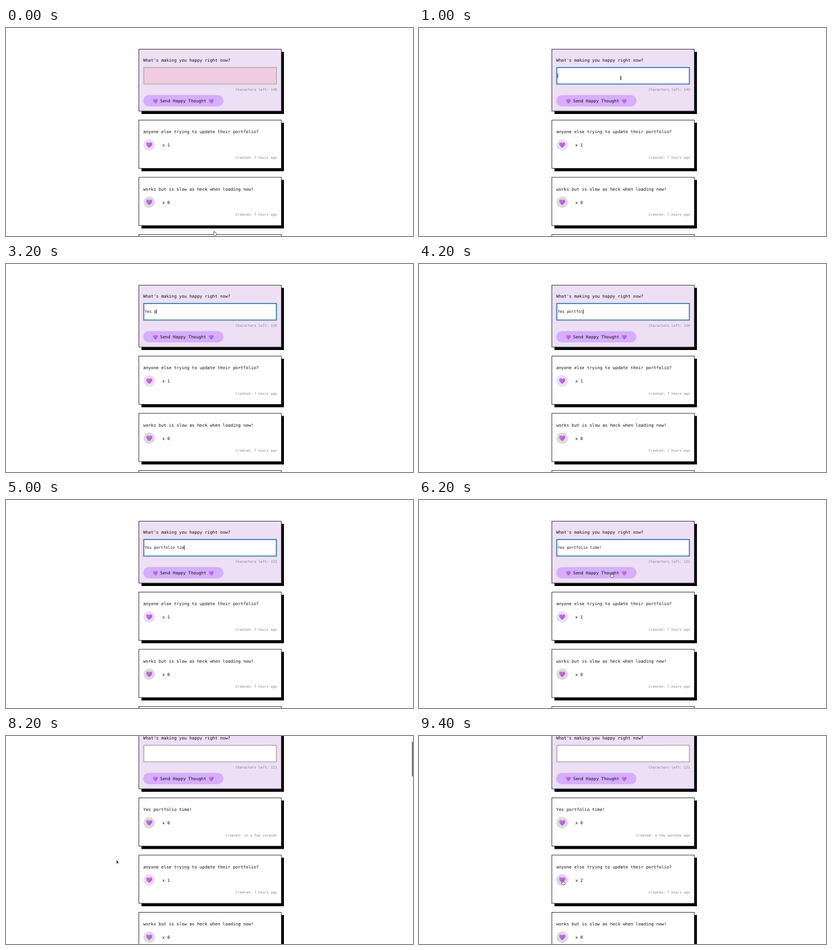
Recreate the animation shown at these times as an HTML page. Size 700 px wide and 358 px high, loop 10 s.

```html
<!DOCTYPE html>
<html lang="en">
<head>
<meta charset="utf-8">
<title>Happy thoughts</title>
<style>
  html, body { margin: 0; width: 100%; height: 100%; overflow: hidden; background: #fefefe; }
  svg { display: block; width: 700px; height: 358px; }
  text { font: 7.34px "DejaVu Sans Mono", monospace; fill: #111; white-space: pre; }
  .small { font-size: 5.9px; fill: #85808a; text-anchor: end; }
  .typed { font-size: 6.6px; }
  .panel { fill: #fff; stroke: #3a3a3a; }
  .form { fill: #eddff4; }
  .heart { fill: url(#purple); }
  .pointer { fill: #fff; stroke: #333; stroke-width: .7; stroke-linejoin: round; }
</style>
</head>
<body>
<svg viewBox="0 0 700 358">
  <defs>
    <linearGradient id="purple" x2="1" y2="1">
      <stop offset="0" stop-color="#cb72ea"/>
      <stop offset="1" stop-color="#a955d8"/>
    </linearGradient>
    <path id="heart" d="M0 5C-2 3.4-5.2 1-5.2-1.8C-5.2-5.2-1.2-5.6 0-2.8C1.2-5.6 5.2-5.2 5.2-1.8C5.2 1 2 3.4 0 5Z"/>
  </defs>
  <g id="page">
    <rect x="233" y="41" width="245" height="107"/>
    <rect class="panel form" x="228.5" y="36.5" width="245" height="106.5"/>
    <text x="236" y="58">What's making you happy right now?</text>
    <rect id="field" x="237" y="68" width="228" height="28.5"/>
    <text id="typed" class="typed" x="238.5" y="84.3"></text>
    <rect id="caret" y="78" width=".8" height="8"/>
    <text id="left" class="small" x="466" y="108.3"></text>
    <rect x="236" y="115.5" width="138" height="19.5" rx="9.75" fill="#d5aefd"/>
    <use href="#heart" class="heart" transform="translate(257 126) scale(.78)"/>
    <text x="265" y="128">Send Happy Thought</text>
    <use href="#heart" class="heart" transform="translate(353 126) scale(.78)"/>
    <g id="newCard"></g>
    <g id="oldCards"></g>
  </g>
  <rect id="thumb" x="698" width="2" height="60" rx="1" fill="#777"/>
  <g id="arrow"><path d="M0-3V4L1.5 2.6L2.5 4.8L3.5 4.3L2.5 2.3H4.3Z" fill="#111" stroke="#fff" stroke-width=".5"/></g>
  <g id="beam"><path d="M-1.3-3.2Q0-3.2 0-2V2Q0 3.2-1.3 3.2M1.3-3.2Q0-3.2 0-2V2Q0 3.2 1.3 3.2" fill="none" stroke="#222" stroke-width=".8"/></g>
  <g id="hand"><path class="pointer" d="M-1.5 1V-3Q-.8-4.2 0-3V-.8Q2.8-1 3 .4V2.2L2.2 4H-1L-3 1.2Q-3 .2-1.5 1Z"/></g>
</svg>
<script>
const $ = id => document.getElementById(id);
const LOOP = 10000, STEP = 200, PITCH = 98.5, LIMIT = 140;
const message = 'Yes portfolio time!';

const show = (node, on) => node.setAttribute('display', on ? 'inline' : 'none');
const setText = (node, value) => { if (node.textContent !== value) node.textContent = value; };

function card(index, title, likes, created) {
  return `<g transform="translate(0 ${158 + index * PITCH})">
    <rect x="233" y="5" width="245" height="83.5"/>
    <rect class="panel" x="228.5" y=".5" width="245" height="83"/>
    <text x="236" y="23">${title}</text>
    <circle cx="246.3" cy="43.3" r="10" fill="${likes ? '#ecdcf9' : '#dcdbde'}"/>
    <use href="#heart" class="heart" x="246.3" y="43.3"/>
    <text class="likes" x="268.7" y="46">x ${likes}</text>
    <text class="small created" x="466" y="66.7">Created: ${created}</text>
  </g>`;
}

$('newCard').innerHTML = card(0, message, 0, 'in a few seconds');
$('oldCards').innerHTML =
  card(0, 'anyone else trying to update their portfolio?', 1, '7 hours ago') +
  card(1, 'works but is slow as heck when loading now!', 0, '7 hours ago') +
  card(2, '', 0, '');

const newCreated = document.querySelector('#newCard .created');
const likes = document.querySelector('#oldCards .likes');
const likeCircle = document.querySelector('#oldCards circle');

// Each row: time, x, y, pointer shape
const pointerPath = [
  [0, 359, 353, 'hand'], [200, 356, 280, 'arrow'], [400, 350, 150, 'arrow'],
  [600, 347, 86, 'beam'], [2200, 0, 0, ''],
  [5800, 346, 90, 'beam'], [6000, 339, 113, 'arrow'], [6200, 332, 129, 'hand'],
  [6800, 300, 145, 'arrow'], [7200, 215, 178, 'arrow'], [7600, 169, 197, 'arrow'],
  [8200, 190, 216, 'arrow'], [8400, 225, 240, 'arrow'], [8600, 248, 252, 'hand']
];
const scrollPath = [[0, 0], [7600, 24], [7800, 38], [8000, 47], [8200, 52]];
const latest = (rows, t) => rows.filter(row => row[0] <= t).pop();

function typedCount(t) {
  if (t < 1400) return 0;
  if (t < 1600) return 1;
  if (t < 1800) return 3;
  if (t < 3200) return 4;
  return Math.min(message.length, 5 + Math.floor((t - 3200) / 150));
}

function draw(t) {
  const focused = t >= 1000 && t < 6800;
  const posted = t >= 6800;
  const liked = t >= 9400;
  const count = typedCount(t);
  const scroll = latest(scrollPath, t)[1];
  const [, x, y, shape] = latest(pointerPath, t);

  $('page').setAttribute('transform', `translate(0 ${-scroll})`);
  $('field').setAttribute('fill', t < 1000 ? '#f2cbe0' : '#fff');
  $('field').setAttribute('stroke', focused ? '#3d78b0' : '#b9b5bb');
  $('field').setAttribute('stroke-width', focused ? 1.7 : 1.8);
  setText($('typed'), posted ? '' : message.slice(0, count));
  setText($('left'), `Characters left: ${LIMIT - count}`);
  $('caret').setAttribute('x', 238.5 + count * 3.973);
  show($('caret'), focused && t < 5800 && !(t >= 2200 && t < 2600));

  show($('newCard'), posted);
  $('oldCards').setAttribute('transform', `translate(0 ${posted ? PITCH : 0})`);
  setText(newCreated, `Created: ${liked ? 'a few seconds ago' : 'in a few seconds'}`);
  setText(likes, liked ? 'x 2' : 'x 1');
  likeCircle.setAttribute('fill', t >= 8600 ? '#e3caf6' : '#ecdcf9');

  $('thumb').setAttribute('y', 1 + scroll * 0.168);
  show($('thumb'), t >= 7600 && t < 8800);
  for (const id of ['arrow', 'beam', 'hand']) {
    show($(id), id === shape);
    $(id).setAttribute('transform', `translate(${x} ${y})`);
  }
}

const start = performance.now();
function tick() {
  const t = (performance.now() - start) % LOOP;
  draw(Math.floor(t / STEP) * STEP);
  requestAnimationFrame(tick);
}
tick();
</script>
</body>
</html>
```
